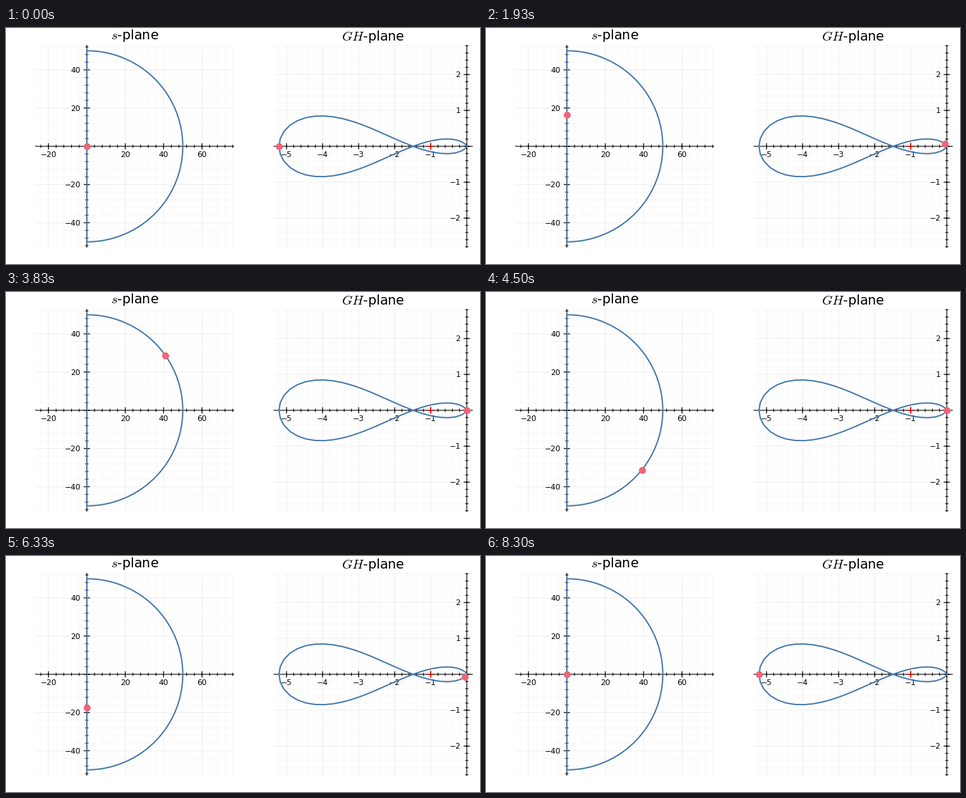
A matplotlib script that plays this animation: 750 px wide and 375 px high, repeating every 8330 ms.

```python
import numpy as np
import matplotlib.pyplot as plt
from matplotlib.animation import FuncAnimation
from matplotlib.collections import LineCollection

W, H, DPI = 750, 375, 100
LOOP_MS = 8330
SUBSTEPS = 2  # animation steps per pose
BLUE, PINK = "#4477AA", "#EE6677"
PX = 72 / DPI  # points per pixel

plt.rcParams.update({"font.family": "DejaVu Sans", "mathtext.fontset": "cm"})
fig = plt.figure(figsize=(W / DPI, H / DPI), dpi=DPI, facecolor="white")
ax = fig.add_axes([0, 0, 1, 1])
ax.set(xlim=(0, W), ylim=(H, 0))
ax.axis("off")


def contour():
    """Nyquist path: up the imaginary axis, around the arc, back up to zero."""
    up = np.r_[np.linspace(0, 10, 50), np.linspace(10, 50, 50)]
    arc = 50 * np.exp(1j * np.linspace(np.pi / 2, -np.pi / 2, 50))
    return np.r_[1j * up, arc, -1j * up[::-1]]


def loop_gain(s):
    return 500 / ((s - 2) * (s + 6) * (s + 8))


def segments(lines, color, width, z):
    ax.add_collection(LineCollection(lines, colors=color, linewidths=width * PX,
                                     zorder=z, snap=False))


class Plane:
    """Complex plane with axes through the origin, laid out in pixels."""

    def __init__(self, title, baseline, origin, scale, box, step):
        self.ox, self.oy = origin
        self.scale = scale
        self.x0, self.x1, self.y0, self.y1 = box
        self.grid(step / 5, "#f8f8f8", 2.5)
        self.grid(step, "#f0f0f0", 5)
        segments([[(self.x0, self.oy), (self.x1, self.oy)],
                  [(self.ox, self.y0), (self.ox, self.y1)]], "black", 1.15, 2)
        self.labels(step)
        ax.text((self.x0 + self.x1) / 2, baseline, title, size=20.8 * PX,
                ha="center", va="baseline")

    def ticks(self, step):
        def inside(lo, hi):
            return np.arange(np.ceil(lo / step), np.floor(hi / step) + 1) * step
        k = self.scale
        return (inside((self.x0 - self.ox) / k, (self.x1 - self.ox) / k),
                inside((self.oy - self.y1) / k, (self.oy - self.y0) / k))

    def grid(self, step, color, tick):
        xs, ys = self.ticks(step)
        xs, ys = self.ox + xs * self.scale, self.oy - ys * self.scale
        segments([[(x, self.y0), (x, self.y1)] for x in xs]
                 + [[(self.x0, y), (self.x1, y)] for y in ys], color, 1, 1)
        segments([[(x, self.oy - tick), (x, self.oy + tick)] for x in xs]
                 + [[(self.ox - tick, y), (self.ox + tick, y)] for y in ys], "black", 1.15, 2)

    def labels(self, step):
        xs, ys = self.ticks(step)
        for v in xs[xs != 0]:
            self.label(v, self.ox + v * self.scale, self.oy + 17, "center")
        for v in ys[ys != 0]:
            self.label(v, self.ox - 10, self.oy - v * self.scale + 4.3, "right")

    def label(self, v, x, y, align):
        ax.text(x, y, f"{v:.0f}".replace("-", "\u2212"), size=12.1 * PX,
                ha=align, va="baseline", zorder=2)

    def pixels(self, z):
        return self.ox + z.real * self.scale, self.oy - z.imag * self.scale

    def trace(self, z):
        self.path = self.pixels(z)
        ax.plot(*self.path, color=BLUE, lw=2.1 * PX, zorder=3)
        self.dot, = ax.plot([], [], "o", color=PINK, ms=11 * PX, mew=0,
                            zorder=5, snap=False)

    def move(self, i):
        x, y = self.path
        self.dot.set_data([x[i]], [y[i]])


s = contour()
left = Plane("$s$-plane", 18, (127.9, 188), 3.037, (46, 361, 27, 349), 20)
right = Plane("$GH$-plane", 20.5, (729.1, 188), 57.05, (423.5, 738.5, 27, 349), 1)
left.trace(s)
right.trace(loop_gain(s))

cx, cy = right.pixels(np.complex128(-1))
segments([[(cx - 5.5, cy), (cx + 5.5, cy)], [(cx, cy - 5.5), (cx, cy + 5.5)]], "red", 1.4, 4)


def update(step):
    # each pose is centred on its nominal time
    i = (step + 1) // SUBSTEPS % len(s)
    left.move(i)
    right.move(i)
    return left.dot, right.dot


steps = SUBSTEPS * len(s)
anim = FuncAnimation(fig, update, frames=steps, init_func=lambda: update(0),
                     interval=LOOP_MS / steps, repeat=True, repeat_delay=0)
plt.show()
```
